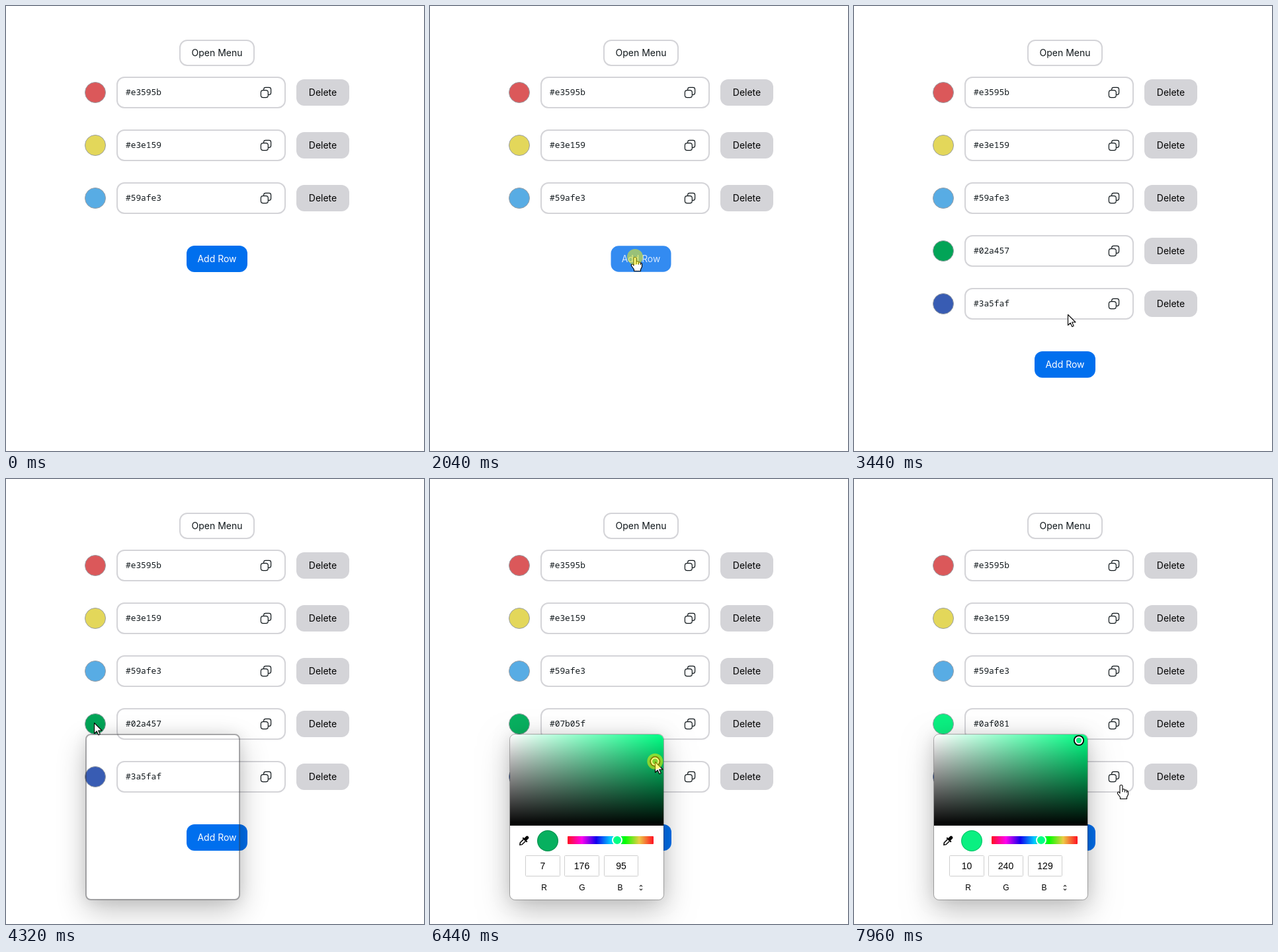
An HTML page with a canvas that plays this animation: 632x674 px, repeating every 8 s.

```html
<!DOCTYPE html>
<html lang="en">
<head>
<meta charset="utf-8">
<title>Color rows</title>
<style>
html, body { margin: 0; width: 100%; height: 100%; overflow: hidden; background: #fff; }
canvas { display: block; }
</style>
</head>
<body>
<canvas id="stage" width="632" height="674"></canvas>
<script>
const ctx = document.getElementById('stage').getContext('2d');
const LOOP = 8000, STEP = 40, PITCH = 80;
const INK = '#11181c', GRAY = '#d4d4d8', BLUE = '#006fee', PURE = 'rgb(0,255,132)';
const SANS = '14px Inter, sans-serif';
const MONO = '12.83px "Noto Sans Mono", monospace';
const ARIAL = '"Liberation Sans", Arial, sans-serif';

// label, swatch fill
const ROWS = [
  ['#e3595b', '#db585a'], ['#e3e159', '#e3d75a'], ['#59afe3', '#58ace4'],
  ['#02a457', '#02a457'], ['#3a5faf', '#385cb3']
];
const rowY = i => 131 + PITCH * i;
const addY = count => rowY(count) + 12;

const ADD_TIMES = [2120, 3240];
const PANEL = { frame: 4320, open: 4360, x: 121, y: 387, w: 232, h: 250 };
const DRAG = [5760, 7840];
const HOVERS = [[1800, ADD_TIMES[0]], [2640, ADD_TIMES[1]]];
const PRESSES = [[2000, ADD_TIMES[0]], [3080, ADD_TIMES[1]], [4200, 4280], DRAG];

// Pointer moves: begin, end, where to
const ENTRY = [570, 568];
const MOVES = [
  [440, 600, [585, 397]],
  [1400, 1880, [310, addY(3) - 3]],
  [2280, 2760, [325, addY(4) + 5]],
  [3400, 4160, [133, rowY(3) - 2]],
  [4400, 4720, [202, 445]],
  [4720, 5160, [337, 428]],
  [5280, 5520, [339, 420]],
  [5760, 6040, [344, 431]],
  [6320, 6400, [340.3, 427.8]],
  [6440, 6960, [331, 410]],
  [6960, 7160, [334, 402]],
  [7200, 7520, [340, 396]],
  [7800, 7960, [404, 463]]
];

const clamp = v => Math.min(1, Math.max(0, v));
const smooth = v => v * v * (3 - 2 * v);
const within = ([a, b], t) => t >= a && t < b;

function pointer(t) {
  let pos = ENTRY;
  for (const [a, b, to] of MOVES) {
    if (t <= a) break;
    const k = smooth(clamp((t - a) / (b - a)));
    pos = pos.map((v, i) => v + (to[i] - v) * k);
  }
  return pos;
}

// Saturation and value follow the pointer; the hue stays fixed.
function picked(t) {
  if (t < DRAG[0]) return { x: 346.7, y: 433.8, rgb: [2, 164, 87] };
  const [x, y] = pointer(Math.min(t, DRAG[1] - STEP));
  const max = 255 * (1 - (y - 388.5) / 127);
  const min = max * (1 - (x - 119.5) / 230);
  return { x, y, rgb: [min, max, min + (max - min) * 0.518].map(Math.round) };
}

const toHex = rgb => '#' + rgb.map(v => v.toString(16).padStart(2, '0')).join('');

function paint(fill, stroke, lw) {
  if (fill) { ctx.fillStyle = fill; ctx.fill(); }
  if (stroke) { ctx.strokeStyle = stroke; ctx.lineWidth = lw; ctx.stroke(); }
}

function box(x, y, w, h, r, fill, stroke, lw = 1) {
  ctx.beginPath();
  ctx.roundRect(x, y, w, h, r);
  paint(fill, stroke, lw);
}

function disc(x, y, r, fill, stroke, lw = 1) {
  ctx.beginPath();
  ctx.arc(x, y, r, 0, Math.PI * 2);
  paint(fill, stroke, lw);
}

function text(str, x, y, font, color = INK, align = 'center') {
  ctx.font = font;
  ctx.fillStyle = color;
  ctx.textAlign = align;
  ctx.fillText(str, x, y);
}

function at(x, y, draw) {
  ctx.save();
  ctx.translate(x, y);
  draw();
  ctx.restore();
}

function line(d, color, lw) {
  ctx.strokeStyle = color;
  ctx.lineWidth = lw;
  ctx.stroke(new Path2D(d));
}

function drawRow(y, label, fill) {
  disc(135, y, 15.5, fill, '#9a9fa5');
  box(168, y - 23, 254, 46, 11, '#fff', GRAY, 2);
  text(label, 181, y + 4, MONO, INK, 'left');
  at(393, y, () => {
    ctx.scale(0.95, 0.95);
    box(-8, -3.5, 11.5, 11.5, 3.5, null, INK, 1.25);
    line('M-3.5-3.5V-5Q-3.5-8-.5-8H5Q8-8 8-5V.5Q8 3.5 5 3.5H3.5', INK, 1.25);
  });
  box(439, y - 20, 80, 40, 12, GRAY);
  text('Delete', 479, y + 5, SANS, '#000');
}

function hoverLevel(t) {
  return Math.max(...HOVERS.map(([a, b]) => Math.min(clamp((t - a) / 160), clamp(1 - (t - b) / 120))));
}

function drawAdd(t, count) {
  const press = PRESSES.slice(0, 2).find(p => within(p, t));
  const scale = press ? 1 - 0.03 * clamp((t - press[0]) / 110) : 1;
  at(319, addY(count), () => {
    ctx.scale(scale, scale);
    ctx.globalAlpha = 1 - 0.2 * hoverLevel(t);
    box(-46, -20, 92, 40, 12, BLUE);
    text('Add Row', 0, 5, SANS, '#fff');
  });
}

function panelShadow() {
  const { x, y, w, h } = PANEL, away = 2000;
  ctx.save();
  ctx.beginPath();
  ctx.rect(0, 0, 632, 674);
  ctx.roundRect(x, y, w, h, 8);
  ctx.clip('evenodd');
  for (const [dy, blur, alpha] of [[16, 46, 0.24], [0, 22, 0.1]]) {
    ctx.shadowColor = `rgba(0,0,0,${alpha})`;
    ctx.shadowBlur = blur;
    ctx.shadowOffsetX = away;
    ctx.shadowOffsetY = dy;
    box(x - away, y, w, h, 8, '#000');
  }
  ctx.restore();
}

function ramp(x0, y0, x1, y1, stops) {
  const g = ctx.createLinearGradient(x0, y0, x1, y1);
  stops.forEach((c, i) => g.addColorStop(i / (stops.length - 1), c));
  return g;
}

function drawDropper() {
  at(142, 548, () => {
    ctx.rotate(Math.PI / 4);
    box(-2.5, -9.3, 5, 8, 2.2, '#000');
    box(-4.6, -3.2, 9.2, 2.1, 0.6, '#000');
    line('M-2-1V6L0 8.6 2 6V-1', '#000', 1.5);
  });
}

function drawPanel(t) {
  const { x, y, w, h } = PANEL;
  const pick = picked(t - STEP), color = toHex(pick.rgb);
  box(x, y, w, h, 8, '#fff');
  for (const fill of [ramp(x, 0, x + w, 0, ['#fff', PURE]), ramp(0, y, 0, y + 138, ['rgba(0,0,0,0)', '#000'])])
    box(x, y, w, 138, [8, 8, 0, 0], fill);
  box(x - 0.5, y - 0.5, w + 1, h + 1, 8, null, 'rgba(0,0,0,.28)');

  [[8, '#000'], [6.2, '#fff'], [4.2, color]].forEach(([r, c]) => disc(pick.x, pick.y, r, c));

  drawDropper();
  disc(178, 548, 16, color);
  disc(178, 548, 15.5, null, 'rgba(0,0,0,.2)');
  box(208, 541, 130, 12, 1, ramp(208, 0, 338, 0, ['#f12', '#f0e', '#10e', '#0cf', '#0f0', '#eccb45', '#f12']));
  disc(283, 547, 7, PURE, '#fff', 2);

  pick.rgb.forEach((v, i) => {
    const left = Math.floor(144 + 59.5 * i), right = Math.floor(196.4 + 59.1 * i);
    box(left + 0.5, 570.5, right - left, 31, 1, '#fff', '#cfcfcf');
    text(v, (left + right + 1) / 2, 591, '14px ' + ARIAL, '#000');
    text('RGB'[i], 172.5 + 57.5 * i, 623, '12px ' + ARIAL, '#000');
  });
  at(319, 619, () => line('M-2-1.6L0-3.6 2-1.6M-2 1.6L0 3.6 2 1.6', '#222', 1.1));
}

const ARROW = new Path2D('M.5.5V16.5L4.2 13 6.8 18.7 9.2 17.6 6.7 12H12Z');
const HAND = new Path2D('M-2 2Q-2 .5 0 .5 2 .5 2 2V7Q5 6 5.5 8.3 8 7.3 8.5 9.3 10.5 9 10.5 11V15L8.5 19V21.5H-1.5V19L-5.5 13.5Q-6 10.5-3.5 11L-2 13ZM2 7V11M5.5 8.3V11.5M8.5 9.3V12');

function overButton(x, y, t, count) {
  const inside = (l, top, w, h) => x >= l && x <= l + w && y >= top && y <= top + h;
  if (t >= PANEL.open && inside(PANEL.x, PANEL.y, PANEL.w, PANEL.h)) return false;
  const onRow = ROWS.slice(0, count).some((_, i) =>
    inside(439, rowY(i) - 20, 80, 40) || inside(377, rowY(i) - 16, 32, 32));
  return onRow || inside(273, addY(count) - 20, 92, 40);
}

function drawCursor(t, count) {
  if (t <= MOVES[0][0]) return;
  const [x, y] = pointer(t);
  const shape = overButton(x, y, t, count) ? HAND : ARROW;
  at(Math.round(x), Math.round(y), () => {
    ctx.lineJoin = 'round';
    ctx.fillStyle = '#fff';
    ctx.fill(shape);
    ctx.strokeStyle = '#000';
    ctx.lineWidth = 1.1;
    ctx.stroke(shape);
  });
  if (PRESSES.some(p => within(p, t))) disc(x, y, 12, 'rgba(255,248,0,.5)');
}

function draw(t) {
  ctx.fillStyle = '#fff';
  ctx.fillRect(0, 0, 632, 674);
  box(263, 52, 112, 38, 11, '#fff', GRAY, 2);
  text('Open Menu', 319, 76, SANS);

  const count = 3 + ADD_TIMES.filter(a => t >= a).length;
  const live = toHex(picked(t).rgb);
  ROWS.slice(0, count).forEach(([label, fill], i) =>
    i === 3 ? drawRow(rowY(i), live, live) : drawRow(rowY(i), label, fill));
  drawAdd(t, count);

  if (t >= PANEL.frame) panelShadow();
  if (t >= PANEL.open) drawPanel(t);
  else if (t >= PANEL.frame) box(PANEL.x, PANEL.y, PANEL.w, PANEL.h, 7, null, 'rgba(60,60,65,.42)', 2);
  drawCursor(t, count);
}

const start = performance.now();
function tick() {
  const t = (performance.now() - start) % LOOP;
  draw(Math.floor(t / STEP) * STEP);
  requestAnimationFrame(tick);
}
tick();
</script>
</body>
</html>
```
